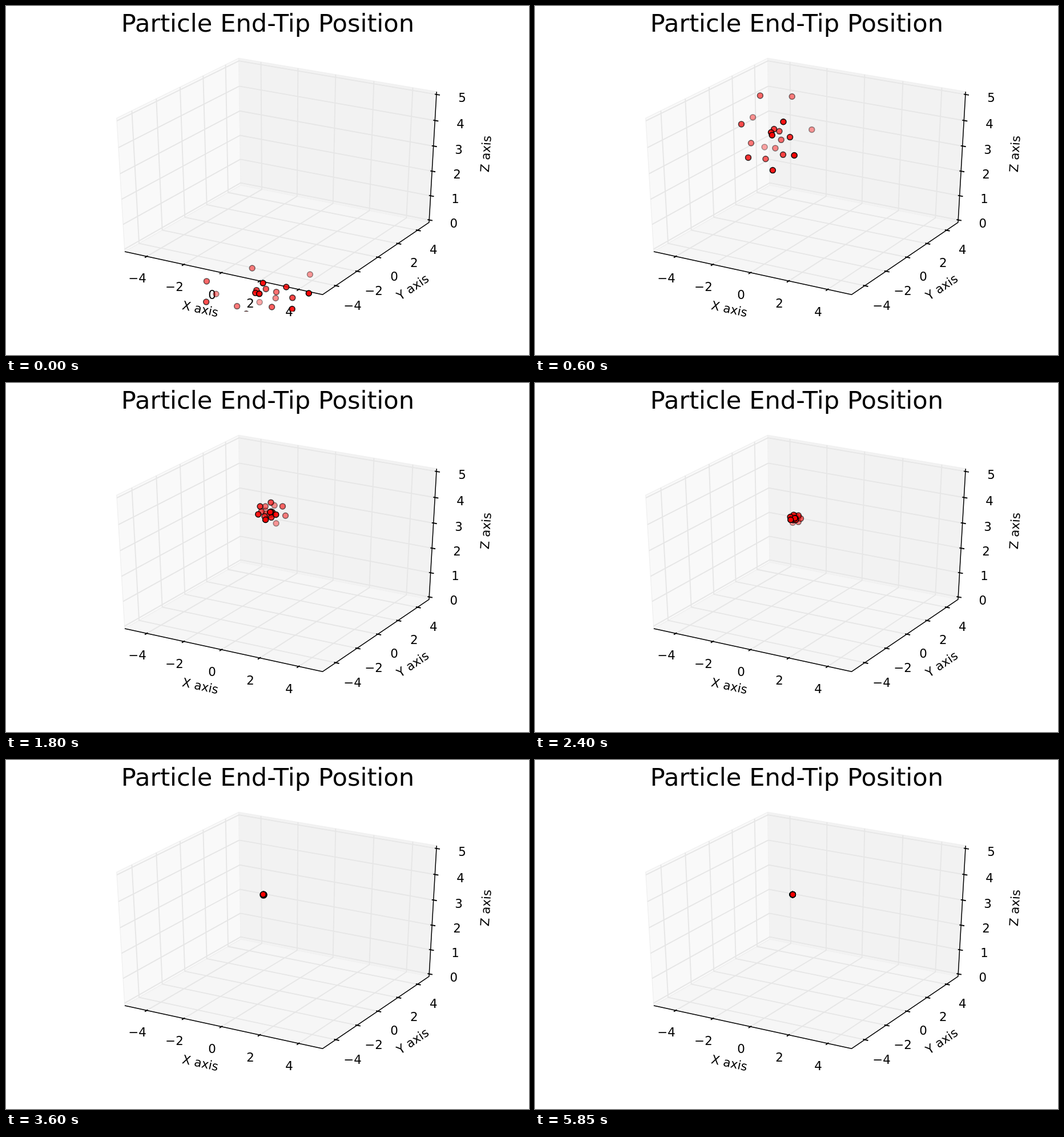
Write an HTML page with a canvas that moves like this. It is 916 px wide and 611 px high and loops after 6000 ms.

```html
<!DOCTYPE html>
<html lang="en">
<head>
<meta charset="utf-8">
<title>Particle End-Tip Position</title>
<style>
html, body { margin: 0; width: 100%; height: 100%; overflow: hidden; background: #fff; }
canvas { display: block; }
</style>
</head>
<body>
<canvas id="stage" width="916" height="611"></canvas>
<script>
const ctx = document.getElementById('stage').getContext('2d');
const LOOP = 6000, STEP = 150, COUNT = 20;
const FONT = '"DejaVu Sans", Verdana, sans-serif';
const TICKS = [-4, -2, 0, 2, 4];
const LEVELS = [0, 1, 2, 3, 4, 5];

// Perspective view of a unit cube, azimuth -60 and elevation 30 degrees.
function project([x, y, z]) {
  x -= 0.5; y -= 0.5; z -= 0.5;
  const depth = 1 - 0.0433 * x + 0.075 * y - 0.05 * z;
  return [
    478.6 + 399.85 * (0.866 * x + 0.5 * y) / depth,
    291.3 - 266.9 * (-0.25 * x + 0.433 * y + 0.866 * z) / depth
  ];
}
const across = v => (v + 5 + 10 / 48) / (10 + 10 / 24);
const up = v => (v + 5 / 48) / (5 + 5 / 24);

function trace(points) {
  ctx.beginPath();
  for (const p of points) ctx.lineTo(...project(p));
}
function line(points, color, width) {
  trace(points);
  ctx.strokeStyle = color;
  ctx.lineWidth = width;
  ctx.stroke();
}
function pane(points, fill) {
  trace(points);
  ctx.closePath();
  ctx.fillStyle = fill;
  ctx.fill();
  ctx.strokeStyle = '#f0f0f0';
  ctx.lineWidth = 1.4;
  ctx.stroke();
}
function label(text, x, y, angle = 0, size = 21.3) {
  ctx.save();
  ctx.translate(x, y);
  ctx.rotate(angle * Math.PI / 180);
  ctx.font = `${size}px ${FONT}`;
  ctx.textAlign = 'center';
  ctx.fillStyle = '#000';
  ctx.fillText(text, 0, size * 0.36);
  ctx.restore();
}

// A tick runs along `dir`; its label is pushed away from the cube along `out`.
function tick(value, at, dir, out) {
  const shift = (v, k) => at.map((c, i) => c + v[i] * k);
  line([shift(dir, -0.0083), shift(dir, 0.0167)], '#000', 1.9);
  const [x, y] = project(shift(out, 0.0825));
  label(String(value).replace('-', '\u2212'), x + 0.5, y + 9.5);
}

function drawAxes() {
  ctx.fillStyle = '#fff';
  ctx.fillRect(0, 0, 916, 611);
  ctx.lineJoin = 'round';
  pane([[0, 0, 0], [0, 1, 0], [0, 1, 1], [0, 0, 1]], '#f9f9f9');
  pane([[0, 1, 0], [1, 1, 0], [1, 1, 1], [0, 1, 1]], '#f2f2f2');
  pane([[0, 0, 0], [1, 0, 0], [1, 1, 0], [0, 1, 0]], '#f6f6f6');

  const grid = points => line(points, '#e6e6e6', 1.9);
  for (const s of TICKS.map(across)) {
    grid([[s, 0, 0], [s, 1, 0], [s, 1, 1]]);
    grid([[1, s, 0], [0, s, 0], [0, s, 1]]);
  }
  for (const s of LEVELS.map(up)) grid([[0, 0, s], [0, 1, s], [1, 1, s]]);

  line([[0, 0, 0], [1, 0, 0], [1, 1, 0], [1, 1, 1]], '#000', 1.5);
  for (const v of TICKS) {
    const s = across(v);
    tick(v, [s, 0, 0], [0, -1, 0], [0, -1, -1]);
    tick(v, [1, s, 0], [1, 0, 0], [1, 0, -1]);
  }
  for (const v of LEVELS) tick(v, [1, 1, up(v)], [1, 0, 0], [1, 1, 0]);

  label('X axis', 340.5, 530, 12.2);
  label('Y axis', 712, 492, -34);
  label('Z axis', 840, 259, -86.5);
  label('Particle End-Tip Position', 458.5, 29.7, 0, 43.2);
}

// The swarm's centre and half-spread as it converges.
const PHASES = [
  { t: 0, x: 446, y: 503, w: 125, h: 48 },
  { t: 600, x: 417, y: 226, w: 70, h: 85 },
  { t: 1200, x: 471, y: 216, w: 48, h: 34 },
  { t: 2400, x: 455, y: 237, w: 12, h: 8 },
  { t: 3600, x: 451, y: 236, w: 1.3, h: 1.3 },
  { t: 4800, x: 451.3, y: 235.3, w: 0.3, h: 0.3 },
  { t: LOOP, x: 451.3, y: 235.6, w: 0.2, h: 0.2 }
];

function swarmAt(time) {
  const k = PHASES.findIndex(p => p.t > time);
  const a = PHASES[k - 1], b = PHASES[k];
  const u = (time - a.t) / (b.t - a.t);
  const mix = key => a[key] + (b[key] - a[key]) * u;
  return { x: mix('x'), y: mix('y'), w: mix('w'), h: mix('h') };
}

function drawParticles(time) {
  const swarm = swarmAt(time);
  ctx.save();
  ctx.beginPath();
  ctx.rect(0, 0, 916, 535);
  ctx.clip();
  ctx.fillStyle = '#f00';
  ctx.strokeStyle = '#000';
  ctx.lineWidth = 1.7;
  // Far, faint particles first.
  for (let i = COUNT - 1; i >= 0; i--) {
    const reach = ((i * 7 + 13) % COUNT + 0.5) / COUNT;
    const angle = i * 2.4 + time / 900;
    ctx.globalAlpha = 1 - 0.65 * i / (COUNT - 1);
    ctx.beginPath();
    ctx.arc(
      swarm.x + swarm.w * reach * Math.cos(angle),
      swarm.y + swarm.h * reach * Math.sin(angle),
      4.9, 0, Math.PI * 2
    );
    ctx.fill();
    ctx.stroke();
  }
  ctx.restore();
}

const begin = performance.now();
function loop() {
  const elapsed = (performance.now() - begin) % LOOP;
  drawAxes();
  drawParticles(Math.floor(elapsed / STEP) * STEP);
  requestAnimationFrame(loop);
}
loop();
</script>
</body>
</html>
```
